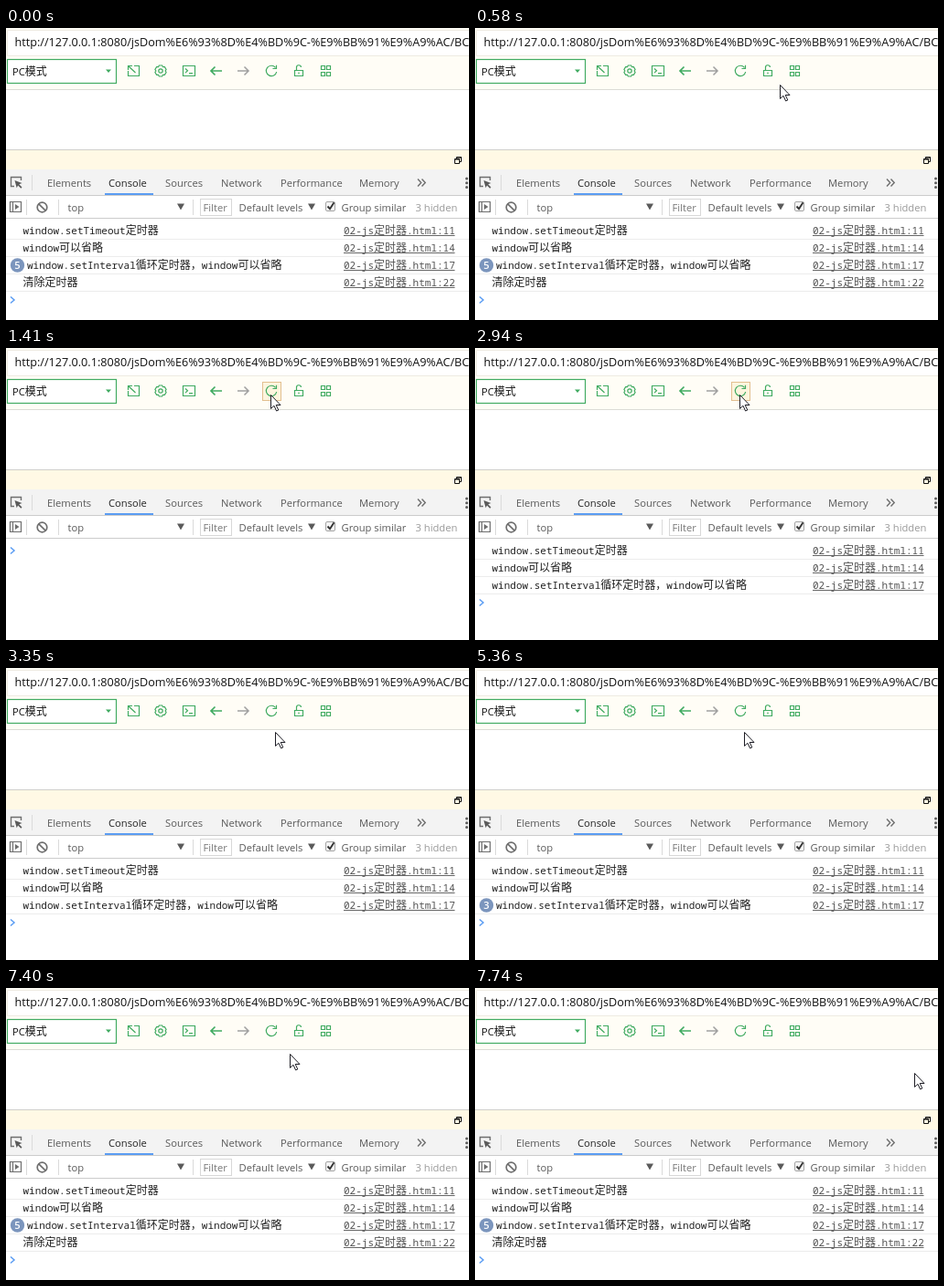
An HTML page that plays this animation: 506x320 px, repeating every 8740 ms.

```html
<!DOCTYPE html>
<html lang="zh">
<head>
<meta charset="utf-8">
<title>Timers in the console</title>
<style>
html, body { margin: 0; width: 100%; height: 100%; overflow: hidden; background: #fff; }
svg { display: block; width: 506px; height: 320px; }
text { white-space: pre; }
.ui { font: 11.2px "Open Sans", "Noto Sans", sans-serif; fill: #5a5a5a; }
.url { font: 12.63px "Open Sans", "Noto Sans", sans-serif; fill: #111; }
.mono { font: 11px "Noto Sans Mono", monospace; fill: #222; }
.cjk { font: 12px "Noto Sans CJK SC", "Noto Sans CJK", sans-serif; }
.icon { fill: none; stroke: #41ab62; stroke-width: 1.2; }
.gray { fill: none; stroke: #6e6e6e; stroke-width: 1.4; }
</style>
</head>
<body>
<svg id="stage" viewBox="0 0 506 320">
  <rect width="506" height="320" fill="#fff"/>

  <!-- browser bar -->
  <rect width="506" height="67" fill="#fffdf6"/>
  <path d="M0 67.5H506" stroke="#dcdcd6"/>
  <path d="M506 2.5H1.5V30.5H506" fill="#fff" stroke="#eeebe1"/>
  <text class="url" x="9.5" y="20">http://127.0.0.1:8080/jsDom%E6%93%8D%E4%BD%9C-%E9%BB%91%E9%A9%AC/BC</text>
  <rect x="1.5" y="34.5" width="119" height="26" fill="#fff" stroke="#41ab62" stroke-width="1.2"/>
  <text class="ui" x="7" y="51.5" style="fill:#111">PC<tspan class="cjk">模式</tspan></text>
  <path d="M109 45.5h6l-3 3.6z" fill="#41ab62"/>
  <rect id="hover" x="280.5" y="37.5" width="20" height="20" fill="#fdf5de" stroke="#e2bf90"/>
  <g class="icon">
    <path d="M140 41.5H145.5V52.5H133.5V47M134 42L141.5 49M133.5 46V41.5H138"/>
    <path d="M167.300 41h3.400l.8 1.700 1.900-.1 1.700 2.900-1 1.500 1 1.500-1.700 2.900-1.900-.1-.8 1.700h-3.400l-.8-1.700-1.900.1-1.700-2.900 1-1.500-1-1.500 1.700-2.900 1.900.1z"/>
    <circle cx="169" cy="47" r="2.200"/>
    <path d="M193.500 41.500h13v11h-13zM196 44.500l2.500 2.300-2.500 2.300M200 49.700h4"/>
    <path d="M236 47H224M228.500 42.500L224 47l4.500 4.500" stroke-width="1.700"/>
    <path d="M253 47h12M260.500 42.500L265 47l-4.500 4.500" stroke="#a0a0a0" stroke-width="1.500"/>
    <path d="M294.500 43.300A5.700 5.700 0 1 0 295.700 48M295.500 40.800V44.500H291.500"/>
    <path d="M315.500 46.500h9v6h-9zM317.500 46.500V43.500a2.500 2.500 0 0 1 5-.5M320 48.500v2"/>
    <path d="M344.500 41.500h4v4h-4zM350.500 41.500h4v4h-4zM344.500 48.500h4v4h-4zM350.500 48.500h4v4h-4z"/>
  </g>

  <!-- panel header -->
  <rect y="133" width="506" height="22" fill="#fff9e5"/>
  <path d="M0 133.500H506" stroke="#cfcfca"/>
  <g fill="#fff9e5" stroke="#111">
    <path d="M492.500 141.500h5v5h-5zM492 142h6"/>
    <path d="M490.500 143.500h5v5h-5zM490 144h6"/>
  </g>
  <rect y="155" width="506" height="28" fill="#f3f3f3"/>
  <path d="M0 183.500H506M0 208.500H506" stroke="#cccccc"/>
  <rect x="108" y="181" width="53" height="2" fill="#5a9cf3"/>
  <g class="gray">
    <path d="M9 173.500H5.500V163.500H16.500V167"/>
    <path d="M9.500 167l8 3-3.200 1.300 3.200 3.200-1.200 1.200-3.200-3.200-1.400 2.800z" fill="#5a5a5a" stroke="none"/>
    <path d="M450 165.500l3.700 4-3.700 4M454.500 165.500l3.700 4-3.700 4"/>
    <path d="M4.500 190.500h12v11h-12zM7.500 190.500v11" stroke-width="1.200"/>
    <path d="M10 193l4.500 3-4.500 3z" fill="#6e6e6e" stroke="none"/>
    <circle cx="39.500" cy="196.500" r="5.300" stroke-width="1.700"/>
    <path d="M35.800 192.800l7.400 7.400" stroke-width="1.700"/>
  </g>
  <path d="M28.500 161v17M22.500 188v17M57.500 188v17M204.500 188v17" stroke="#dadada"/>
  <g fill="#5a5a5a">
    <circle cx="503.500" cy="165" r="1.500"/><circle cx="503.500" cy="169.700" r="1.500"/><circle cx="503.500" cy="174.400" r="1.500"/>
    <path d="M187 192.500h8l-4 7zM330 192.500h8l-4 7z"/>
  </g>
  <rect x="212.500" y="187.500" width="34" height="18" fill="#fff" stroke="#d8d8d8"/>
  <rect x="349.500" y="190.500" width="10" height="10" rx="1.500" fill="#f4f4f4" stroke="#a5a5a5"/>
  <path d="M351.500 195.500l2.500 2.700 4.500-7" fill="none" stroke="#333" stroke-width="1.900"/>
  <g id="labels"></g>

  <!-- console -->
  <g id="log"></g>
  <g id="badge">
    <circle cx="12.500" cy="260" r="7.700" fill="#7b95bd"/>
    <text id="count" class="ui" x="12.500" y="264" text-anchor="middle" style="fill:#fff;font-weight:600"></text>
  </g>
  <path id="prompt" d="M5 -3.500l4 3.500-4 3.500" fill="none" stroke="#5a9cf3" stroke-width="1.500"/>
  <path id="cursor" d="M.5 .5V15.500L4 12.300l2.600 5.700 2.200-1-2.600-5.500h4.800z" fill="#fff" stroke="#1c1c24"/>
</svg>
<script>
const LOOP = 8740;
const $ = id => document.getElementById(id);
const wrapCjk = s => s.replace(/[\u3000-\u9fff\uff00-\uffef]+/g, m => `<tspan class="cjk">${m}</tspan>`);

const labels = [
  ["Elements", 45, 174], ["Console", 112, 174, "#222"], ["Sources", 174, 174],
  ["Network", 235, 174], ["Performance", 300, 174], ["Memory", 386, 174],
  ["top", 67.5, 200.500], ["Filter", 215.500, 201, "#777"], ["Default levels", 254.500, 200.500],
  ["Group similar", 366.500, 200.500], ["3 hidden", 447.500, 200.500, "#999"]
];
$("labels").innerHTML = labels.map(([s, x, y, color = "#5a5a5a"]) =>
  `<text class="ui" x="${x}" y="${y}" style="fill:${color}">${s}</text>`).join("");

const messages = [
  ["window.setTimeout定时器", 11],
  ["window可以省略", 14],
  ["window.setInterval循环定时器，window可以省略", 17],
  ["清除定时器", 22]
];
const rowY = i => 222 + 19 * i;
$("log").innerHTML = messages.map(([s, line], i) => {
  const y = rowY(i);
  return `<g><text class="mono" x="18.500" y="${y + 4}">${wrapCjk(s)}</text>
    <text class="mono" x="369" y="${y + 4}" style="fill:#545454">${wrapCjk(`02-js定时器.html:${line}`)}</text>
    <path d="M369 ${y + 5.5}h121.500" stroke="#666"/>
    <path d="M0 ${y + 9.5}H506" stroke="#ececec"/></g>`;
}).join("");
const rows = [...$("log").children];
const intervalText = rows[2].firstElementChild;

// Progress of a move that advances in n even jumps, the first one at t0.
function steps(t, t0, t1, n) {
  const k = Math.floor((t - t0) / (t1 - t0) * (n - 1) + 1e-6);
  return Math.max(0, Math.min(1, (k + 1) / n));
}
const easeOut = p => 1 - (1 - p) ** 2;
const smooth = p => p * p * (3 - 2 * p);
const bend = (a, b, c, p) => a.map((v, i) =>
  (1 - p) ** 2 * v + 2 * p * (1 - p) * b[i] + p * p * c[i]);
const lerp = (a, b, p) => a.map((v, i) => v + (b[i] - v) * p);

const ENTRY = [500, 78], BUTTON = [290.500, 54], PRESSED = [288.500, 51], REST = [294, 70], EXIT = [480, 93];

function pointer(t) {
  if (t < 370) return null;
  if (t < 1290) return bend(ENTRY, [370, 72], BUTTON, easeOut(steps(t, 370, 830, 12)));
  if (t < 2940) return lerp(BUTTON, PRESSED, steps(t, 1290, 1410, 3));
  if (t < 7320) return lerp(PRESSED, REST, smooth(steps(t, 2990, 3150, 5)));
  return lerp(REST, EXIT, smooth(steps(t, 7320, 7740, 11)));
}

function rowCount(t) {
  if (t < 1290 || t >= 7320) return 4;
  return t < 2940 ? 0 : 3;
}

function repeats(t) {
  if (t < 1290 || t >= 6350) return 5;
  return 1 + [4360, 5360, 6320].filter(at => t >= at).length;
}

const show = (el, on) => el.setAttribute("visibility", on ? "visible" : "hidden");

function render(t) {
  const n = rowCount(t), count = repeats(t), at = pointer(t);
  rows.forEach((row, i) => show(row, i < n));
  const grouped = n > 2 && count > 1;
  show($("badge"), grouped);
  $("count").textContent = count;
  intervalText.setAttribute("x", grouped ? 23 : 18.5);
  $("prompt").setAttribute("transform", `translate(0 ${rowY(n)})`);
  show($("cursor"), at);
  if (at) $("cursor").setAttribute("transform", `translate(${Math.round(at[0])} ${Math.round(at[1])})`);
  show($("hover"), at && at[0] > 280 && at[0] < 301 && at[1] > 37 && at[1] < 58);
}

const start = performance.now();
function tick() {
  render((performance.now() - start) % LOOP);
  requestAnimationFrame(tick);
}
tick();
</script>
</body>
</html>
```
